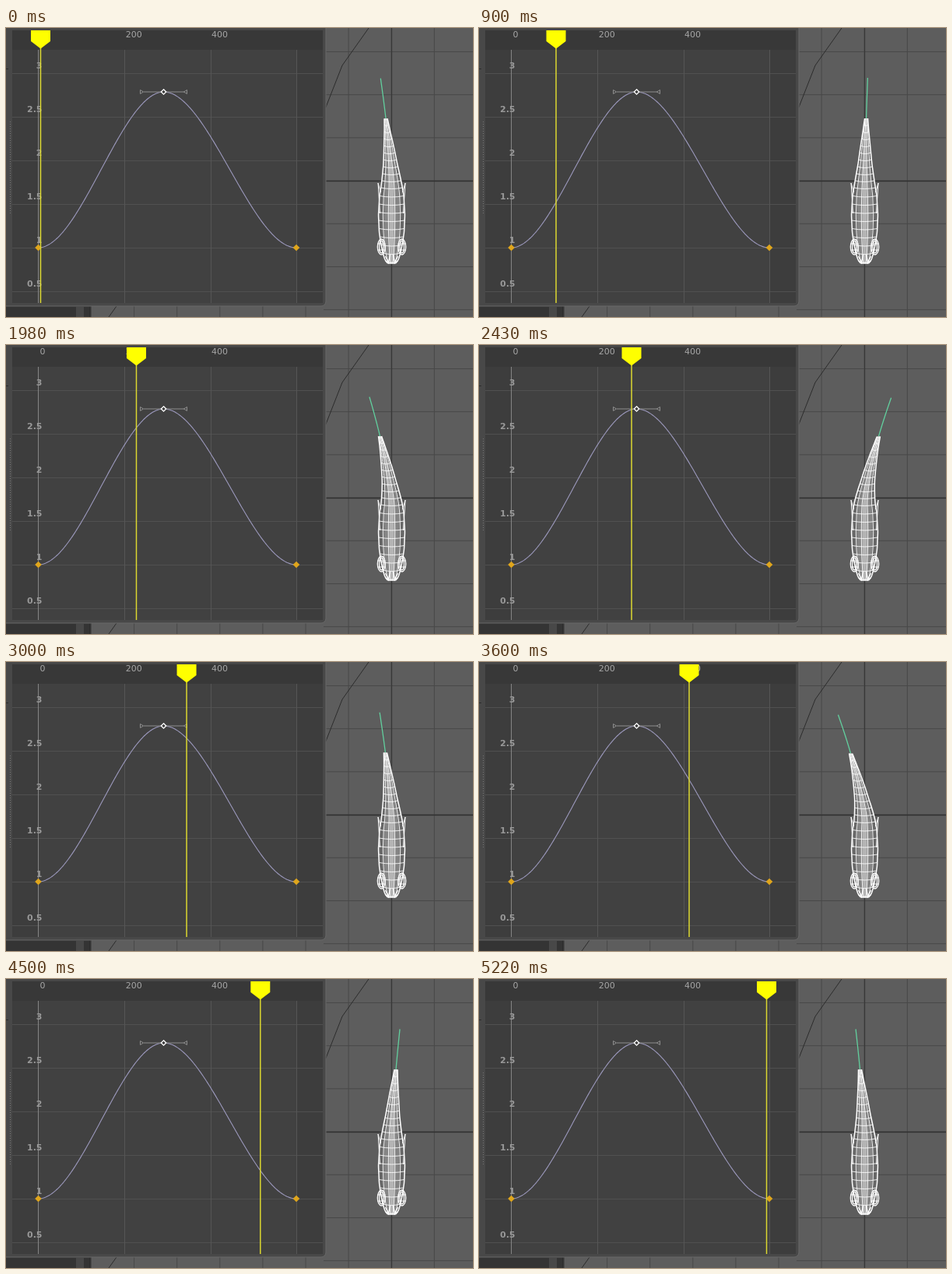
Recreate the animation shown at these times as an HTML page with a canvas. Size 600 by 371 pixels, loop 5250 ms.

```html
<!DOCTYPE html>
<html lang="en">
<head>
<meta charset="utf-8">
<title>Swim speed curve</title>
<style>
html, body { margin: 0; width: 100%; height: 100%; overflow: hidden; background: #5d5d5d; }
canvas { display: block; }
</style>
</head>
<body>
<canvas id="stage" width="600" height="371"></canvas>
<script>
const g = document.getElementById('stage').getContext('2d');
const LOOP = 5250, STEP = 30;
const X0 = 41.5, PEAK = 202.5, X1 = 373, BASE_Y = 282, PEAK_Y = 82;

// time in ms -> playhead x
const PLAYHEAD = [[0, 44.5], [900, 99], [1530, 139], [2430, 196], [3600, 270], [4500, 326.8], [5220, 369.5]];
// y -> half width of the fish
const GIRTH = [[116, 2], [130, 3.5], [150, 6], [175, 9], [200, 13], [215, 15.5], [240, 17],
  [262, 16], [276, 14], [290, 11], [298, 8.5], [302, 5]];

function lerpAt(points, v) {
  let i = 1;
  while (i < points.length - 1 && points[i][0] < v) i++;
  const [a, p] = points[i - 1], [b, q] = points[i];
  return p + (q - p) * (v - a) / (b - a);
}

const ease = u => u * u * (3 - 2 * u);

function speed(x) {
  const u = x < PEAK ? (x - X0) / (PEAK - X0) : (X1 - x) / (X1 - PEAK);
  return 1 + 1.79 * ease(u);
}

// The wave is sin(time * speed), so it runs backwards where the speed drops fast.
const swing = x => -Math.sin(2 * Math.PI * (x - X0) * speed(x) / 44.15);

function path(points, color, width = 1, fill) {
  g.beginPath();
  points.forEach(([x, y]) => g.lineTo(x, y));
  if (fill) {
    g.closePath();
    g.fillStyle = fill;
    g.fill();
  }
  if (color) {
    g.strokeStyle = color;
    g.lineWidth = width;
    g.stroke();
  }
}

const line = (x1, y1, x2, y2, color, width) => path([[x1, y1], [x2, y2]], color, width);

function box(x, y, w, h, color) {
  g.fillStyle = color;
  g.fillRect(x, y, w, h);
}

function diamond(x, y, r, fill, color) {
  path([[x, y - r], [x + r, y], [x, y + r], [x - r, y], [x, y - r]], color, 1.3, fill);
}

function viewport() {
  box(0, 0, 600, 371, '#5d5d5d');
  for (let x = 109.5; x < 600; x += 55.1) line(x, 0, x, 371, '#484848');
  for (let y = 30.5; y < 371; y += 55.2) line(408, y, 600, y, '#484848');
  line(495.5, 0, 495.5, 371, '#383838', 1.2);
  line(408, 196.5, 600, 196.5, '#303030', 1.6);
  path([[466, 0], [432, 48], [410, 104]], '#2c2c2c');
  line(142, 357, 132, 371, '#2c2c2c');
}

function panel() {
  box(0, 357, 108, 14, '#343434');
  box(90, 358, 10, 13, '#484848');
  line(108, 357, 108, 371, '#2a2a2a', 1.5);
  g.beginPath();
  g.roundRect(-8, -8, 419, 365, 6);
  g.fillStyle = '#484848';
  g.fill();
  g.strokeStyle = '#696969';
  g.lineWidth = 1;
  g.stroke();
  line(0, 52.5, 3, 52.5, '#2c2c2c');
  for (let y = 120; y < 238; y += 3) box(5, y, 1, 1, '#777');

  box(8, 3, 399, 350, '#3d3d3d');
  box(41, 28, 332, 325, '#414141');
  box(8, 3, 399, 25, '#383838');
  for (let y = 58; y < 350; y += 56) line(8, y + .5, 407, y + .5, '#505050');
  for (const x of [152.5, 263.5, 373.5]) line(x, 28, x, 353, '#555');
  line(X0, 28, X0, 353, '#858585');

  g.textBaseline = 'middle';
  g.textAlign = 'left';
  g.fillStyle = '#a6a6a6';
  g.font = '11px "DejaVu Sans", sans-serif';
  [0, 200, 400].forEach((n, i) => g.fillText(n, 43.5 + i * 110.3, 9));
  g.textAlign = 'right';
  g.fillStyle = '#989898';
  g.font = 'bold 11px "DejaVu Sans", sans-serif';
  for (let i = 0; i < 6; i++) g.fillText(3 - i / 2, 46.5, 49 + i * 56);
}

function curve() {
  const points = [];
  for (let x = X0; x <= X1; x += 1.5) points.push([x, BASE_Y - (speed(x) - 1) / 1.79 * (BASE_Y - PEAK_Y)]);
  path(points, '#9c99bd', 1.1);
  line(177, PEAK_Y, 229, PEAK_Y, '#8d8d8d');
  for (const side of [-1, 1]) {
    const x = PEAK + side * 30;
    path([[x, 79.5], [x - side * 4, PEAK_Y], [x, 84.5], [x, 79.5]], '#8d8d8d');
  }
  diamond(X0, BASE_Y, 4.3, '#dfa51c');
  diamond(X1, BASE_Y, 4.3, '#dfa51c');
  diamond(PEAK, PEAK_Y, 3.2, '#414141', '#fff');
}

function playhead(x) {
  line(x, 25, x, 353, '#dcd830', 1.5);
  path([[x - 12.5, 3], [x + 12.5, 3], [x + 12.5, 17], [x, 26.5], [x - 12.5, 17]], null, 0, '#ff0');
}

function fish(s) {
  // Bends everything above the shoulders; k runs across the body from -1 to 1.
  const at = (k, y) => {
    const h = Math.max(0, 205 - y) / 89;
    return [495.5 + k * lerpAt(GIRTH, Math.max(y, 116)) + 18 * s * h ** 1.4, y + 1.5 * s * s * h * h];
  };
  const along = (k, from = 116, to = 302) => {
    const points = [];
    for (let y = from; y <= to; y += 3) points.push(at(k, y));
    return points;
  };
  const strip = (k, color) => path([...along(-k), ...along(k).reverse()], null, 0, color);

  path(along(0, 64, 118), '#62cf9e', 1.3);
  strip(1, '#686868');
  strip(.6, '#858585');
  strip(.18, '#b4b4b4');
  for (const k of [-1, -.66, -.25, .25, .66, 1]) path(along(k), '#fff', Math.abs(k) === 1 ? 1.5 : .9);
  for (let y = 124; y < 300; y += y < 200 ? 9 : 10.5) {
    path([-1, -.5, 0, .5, 1].map(k => at(k, y + 1.5 * (1 - k * k))), '#fff', .85);
  }
  for (const side of [-1, 1]) {
    const x = 495.5 + side * 13.2;
    path([[495.5 + side * 15, 238], [495.5 + side * 17.5, 199], [495.5 + side * 14, 211]], '#fff', 1);
    g.strokeStyle = '#fff';
    for (const r of [5, 2.8]) {
      g.beginPath();
      g.ellipse(x, 281, r, r + 5, 0, 0, 7);
      g.lineWidth = 1.3;
      g.stroke();
    }
    line(x - 5, 277, x + 5, 277, '#fff', .9);
    line(x - 5, 285, x + 5, 285, '#fff', .9);
    path([[495.5 + side * 2, 291], [495.5 + side * 4, 301], [495.5 + side * 8, 293]], '#fff', 1.4);
  }
  path([[488, 299], [491, 302], [500, 302], [503, 299]], '#fff', 1.3);
}

function draw(now) {
  const t = Math.floor(now % LOOP / STEP) * STEP;
  const x = lerpAt(PLAYHEAD, t);
  viewport();
  fish(swing(x));
  panel();
  curve();
  playhead(x);
}

const start = performance.now();
function tick() {
  draw(performance.now() - start);
  requestAnimationFrame(tick);
}
tick();
</script>
</body>
</html>
```
